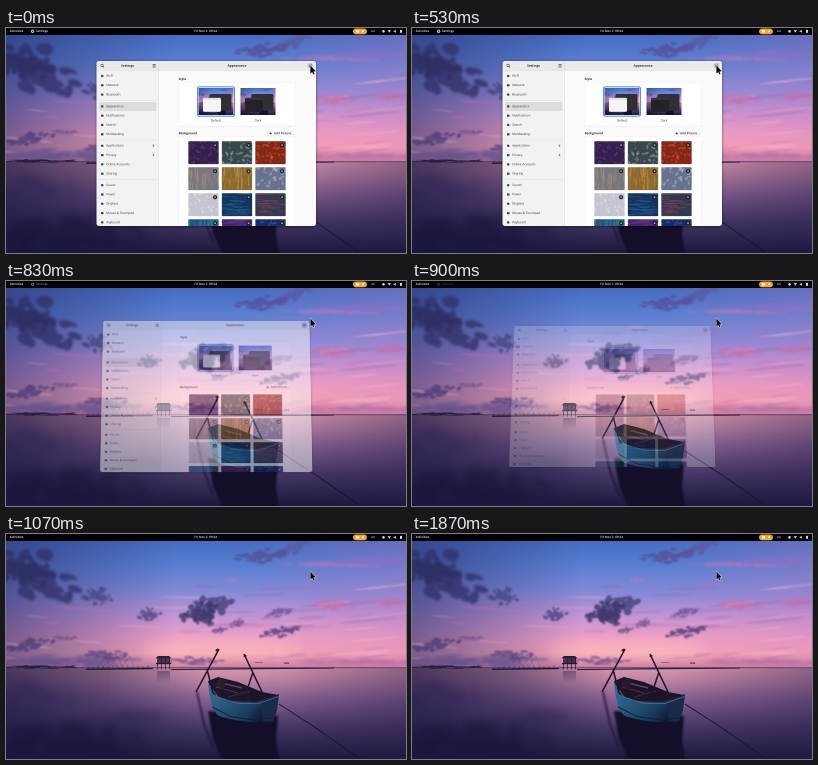
An HTML page with a canvas for the animation above (2000 ms loop, 400 px wide and 225 px high).

```html
<!DOCTYPE html>
<html lang="en">
<head>
<meta charset="utf-8">
<title>Closing a settings window</title>
<style>
html, body { margin: 0; width: 400px; height: 225px; overflow: hidden; background: #000; }
canvas { display: block; width: 400px; height: 225px; }
</style>
</head>
<body>
<canvas id="stage"></canvas>
<script>
const W = 400, H = 225, K = 4, LOOP = 2000;
const FONT = '"Open Sans", "Noto Sans", sans-serif';

// Layers are drawn at K times the stage size and scaled down.
function layer(draw) {
  const c = document.createElement('canvas');
  c.width = W * K;
  c.height = H * K;
  const g = c.getContext('2d');
  g.scale(K, K);
  g.textBaseline = 'middle';
  g.textRendering = 'geometricPrecision';
  draw(g);
  return c;
}

let seed;
const rnd = () => (seed = seed * 16807 % 2147483647) / 2147483647;
const spread = () => rnd() + rnd() - 1;

function box(g, x, y, w, h, fill, r = 0) {
  g.fillStyle = fill;
  g.beginPath();
  g.roundRect(x, y, w, h, r);
  g.fill();
}
function oval(g, x, y, rx, ry, fill, turn = 0) {
  g.fillStyle = fill;
  g.beginPath();
  g.ellipse(x, y, rx, ry, turn, 0, 7);
  g.fill();
}
function line(g, color, width, ...p) {
  g.strokeStyle = color;
  g.lineWidth = width;
  g.beginPath();
  for (let i = 0; i < p.length; i += 2) g.lineTo(p[i], p[i + 1]);
  g.stroke();
}
function poly(g, fill, ...p) {
  g.fillStyle = fill;
  g.beginPath();
  for (let i = 0; i < p.length; i += 2) g.lineTo(p[i], p[i + 1]);
  g.closePath();
  g.fill();
}
function text(g, s, x, y, { size = 3.1, color = '#2e3436', weight = 400, align = 'left' } = {}) {
  g.font = `${weight} ${size}px ${FONT}`;
  g.fillStyle = color;
  g.textAlign = align;
  g.fillText(s, x, y);
}
function fade(g, x0, y0, x1, y1, ...stops) {
  const f = g.createLinearGradient(x0, y0, x1, y1);
  stops.forEach(([at, color]) => f.addColorStop(at, color));
  return f;
}
// One path of overlapping puffs, so that a translucent fill stays even
function cloud(g, x, y, rx, ry, color, turn = 0) {
  g.save();
  g.translate(x, y);
  g.rotate(turn);
  g.beginPath();
  for (let i = 0; i < 60; i++) {
    const px = spread() * rx, py = spread() * ry * (1 - Math.abs(px / rx) * .6);
    const a = rx * (.04 + rnd() * .12), b = ry * (.06 + rnd() * .16);
    g.moveTo(px + a, py);
    g.ellipse(px, py, a, b, 0, 0, 7);
  }
  g.fillStyle = color;
  g.fill();
  g.restore();
}

const wall = layer(g => {
  seed = 7;
  const blur = r => g.filter = r ? `blur(${K * r}px)` : 'none';

  box(g, 0, 0, W, 134, fade(g, 0, 0, 0, 134, [0, '#3f68bf'], [.25, '#5c80d2'], [.45, '#8a8bd8'],
    [.62, '#c496d3'], [.78, '#f0a0c4'], [.89, '#f6a5b8'], [.96, '#dc8da9'], [1, '#c87f9d']));
  box(g, 0, 134, W, 91, fade(g, 0, 134, 0, H, [0, '#d997ae'], [.13, '#bf84a5'], [.36, '#825e90'],
    [.66, '#453866'], [1, '#1c183c']));
  box(g, 0, 0, W, 134, fade(g, 0, 0, 170, 0, [0, '#2b2f6c99'], [1, '#2b2f6c00']));
  box(g, 0, 0, W, 134, fade(g, 250, 0, W, 0, [0, '#c873b400'], [1, '#c873b444']));
  box(g, 0, 134, W, 91, fade(g, 0, 0, 200, 0, [0, '#1a1842c0'], [.5, '#1a184277'], [1, '#1a184200']));
  box(g, 0, 134, W, 91, fade(g, 260, 0, W, 0, [0, '#261a4700'], [1, '#261a4766']));

  // Glow and thin streaks
  blur(6);
  oval(g, 215, 116, 80, 8, '#ffc6bd88');
  blur(.8);
  for (let i = 0; i < 55; i++) {
    const x = rnd() * W, y = 50 + rnd() * 80;
    const color = ['#ffc4d044', '#8560a33c', '#d36fae44'][i % 3];
    oval(g, x, y, 8 + rnd() * 26, .5 + rnd() * 1.3, color, (x - 200) * -.0006);
  }
  blur(1.3);
  cloud(g, 362, 27, 60, 6, '#a06fc066', -.06);
  cloud(g, 325, 31, 50, 2.5, '#d97fbb99', .02);
  cloud(g, 225, 46, 9, 2.5, '#d586bd77');
  cloud(g, 325, 71, 24, 5, '#d4619a99');
  cloud(g, 385, 68, 20, 5, '#d4619a77');
  cloud(g, 350, 128, 70, 4, '#9b5b9a77');
  cloud(g, 60, 127, 85, 7, '#514a8d99');

  // Dark clouds
  cloud(g, 32, 46, 56, 30, '#32326acc', .34);
  cloud(g, 14, 34, 34, 18, '#2c2d60bb', .3);
  blur(.8);
  cloud(g, 93, 61, 15, 11, '#43437fbb', .5);
  cloud(g, 143, 81, 14, 8, '#4c427fcc', -.2);
  cloud(g, 202, 74, 28, 18, '#45407acc', -.35);
  cloud(g, 196, 79, 21, 14, '#3b356acc', -.2);
  cloud(g, 256, 22, 30, 8, '#554d93bb', -.1);
  cloud(g, 287, 14, 22, 8, '#5d529899', -.4);
  cloud(g, 272, 79, 17, 5, '#6e5193cc', -.2);
  cloud(g, 275, 98, 22, 7, '#56407fdd', -.12);
  cloud(g, 232, 89, 9, 5, '#674888bb', -.5);
  cloud(g, 214, 96, 9, 4, '#5a427fcc', -.2);
  cloud(g, 25, 111, 26, 7, '#4d3d78cc', -.2);
  cloud(g, 60, 104, 12, 3, '#5e498699');
  cloud(g, 100, 121, 26, 6, '#563f7fbb');
  cloud(g, 185, 127, 36, 5, '#6f4d8bbb');

  // Cloud reflections
  blur(4);
  cloud(g, 125, 184, 34, 12, '#2c215377');
  cloud(g, 30, 160, 50, 16, '#2b235477');
  cloud(g, 60, 205, 80, 22, '#14112f77');
  blur(0);

  // Shore, jetty and hut
  box(g, 0, 133.4, W, .8, '#4a3160');
  cloud(g, 30, 133, 45, 2, '#231e42');
  line(g, '#231c3a', 1.4, 80, 135.3, 147, 134.5);
  for (let x = 82; x < 147; x += 5) line(g, '#2d2346', .5, x, 131 + rnd() * 2, x, 136);
  for (let x = 92; x < 118; x += 6) line(g, '#3a2e5c77', .4, x, 133, x + 8, 122, x + 12, 133);
  poly(g, '#281c35', 149.5, 124.4, 152, 122, 163, 122, 165.5, 124.4);
  box(g, 152, 124.4, 12, 5, '#46304f');
  box(g, 150, 129, 15, 1.2, '#201831');
  for (const x of [151.5, 155.5, 159.5, 163.5]) line(g, '#201831', .7, x, 124, x, 135.5);
  box(g, 151, 137, 13, 12, fade(g, 0, 137, 0, 149, [0, '#43305f88'], [1, '#43305f00']));
  line(g, '#2c1b38', 1.1, 165, 135.6, 240, 134.8, 328, 134);
  box(g, 249, 128, 8, .7, '#754b7b');
  box(g, 278, 128.5, 5, 1.2, '#573763');

  // Boat and its reflection
  blur(1);
  poly(g, '#130f2a', 202, 177, 272, 182, 270, 206, 273, 227, 217, 227, 207, 205);
  line(g, '#1a1433', 1.6, 191, 158, 198, 190, 207, 214);
  blur(0);
  line(g, '#1a1230', .9, 273, 170, 310, 194, 353, 224);
  g.fillStyle = fade(g, 205, 155, 250, 192, [0, '#2f6b92'], [.4, '#245578'], [.75, '#193c5c'], [1, '#0f1c38']);
  g.beginPath();
  g.moveTo(202, 147);
  g.quadraticCurveTo(216, 167, 250, 167);
  g.lineTo(273, 160);
  g.quadraticCurveTo(271, 180, 267, 188);
  g.quadraticCurveTo(238, 190, 213, 182);
  g.quadraticCurveTo(204, 176, 202, 147);
  g.fill();
  poly(g, '#1a2a48', 255, 168, 273, 160, 271, 176, 267, 187, 257, 187);
  poly(g, '#1d1428', 202, 147, 212, 143, 232, 148, 256, 158, 272, 161, 250, 168, 222, 167, 207, 160);
  line(g, '#557896', .7, 202.5, 150, 212, 163, 232, 169.4, 253, 169.4, 272.5, 162.5);
  line(g, '#5b3049', .9, 210, 153, 232, 159);
  line(g, '#564066', 1.6, 216, 149, 236, 154);
  line(g, '#46314f', .8, 222, 163, 244, 157);
  poly(g, '#2a1a2c', 209, 151, 214, 144, 220, 146, 217, 156);
  line(g, '#112038', 1, 206, 173, 226, 183, 250, 186, 268, 184);
  for (const p of [[213, 115, 190, 158], [201, 135, 207, 159], [238, 120, 257, 160], [247, 138, 240, 159]]) {
    line(g, '#21142a', 1.5, ...p);
  }
  oval(g, 211, 116, 1.8, 1, '#2a1a34', -.6);
  oval(g, 239, 122, 1.5, 1.2, '#2a1a34');
});

const groups = [
  [48, 'Wi-Fi', 'Network', 'Bluetooth'],
  [78.4, 'Appearance', 'Notifications', 'Search', 'Multitasking'],
  [117.8, 'Applications', 'Privacy', 'Online Accounts', 'Sharing'],
  [157.2, 'Sound', 'Power', 'Displays', 'Mouse & Touchpad', 'Keyboard']
];

// Base tone, accent tone, and texture: blobs, vertical or horizontal streaks
const pictures = [
  ['#34204f', '#70408a', 'blob'], ['#38494c', '#a9b6ad', 'blob'], ['#842719', '#d2602b', 'blob'],
  ['#777681', '#b49b68', 'down'], ['#8d692f', '#d5a750', 'down'], ['#66738f', '#bbc5d6', 'blob'],
  ['#c4c5d0', '#e7e7ee', 'blob'], ['#14345f', '#2a73a8', 'across'], ['#30394f', '#a04457', 'across'],
  ['#23577f', '#39a0b2', 'down'], ['#44256e', '#8045a0', 'across'], ['#182d68', '#4462b5', 'blob']
];

function picture(g, x, y, [base, accent, kind]) {
  const w = 30.4, h = 23;
  g.save();
  g.beginPath();
  g.roundRect(x, y, w, h, 1);
  g.clip();
  box(g, x, y, w, h, base);
  g.globalAlpha = .45;
  for (let i = 0; i < 40; i++) {
    const px = x + rnd() * w, py = y + rnd() * h, s = rnd();
    if (kind === 'blob') oval(g, px, py, .4 + s * 2, .3 + s * .9, accent, rnd() * 3);
    if (kind === 'down') box(g, px, py - 5, .4 + s * .5, 4 + s * 9, accent);
    if (kind === 'across') box(g, px - 6, py, 5 + s * 9, .4 + s * .5, accent);
  }
  g.restore();
  oval(g, x + 26.8, y + 4, 2.1, 2.1, '#252329');
  line(g, '#fff', .4, x + 26.1, y + 3.3, x + 27.5, y + 4.7);
  line(g, '#fff', .4, x + 27.5, y + 3.3, x + 26.1, y + 4.7);
}

function stylePreview(g, x, front) {
  g.drawImage(wall, 60 * K, 8 * K, 270 * K, 214 * K, x, 60, 35, 27);
  box(g, x + 11, 66, 22, 16.5, '#302f34', 1.2);
  box(g, x + 4.5, 69.8, 18, 14, front, 1.2);
  box(g, x + 4.5, 69.8, 18, 2, '#8883', 1);
}

const settings = closeColor => layer(g => {
  seed = 41;
  g.save();
  g.shadowColor = '#0008';
  g.shadowBlur = 3 * K;
  g.shadowOffsetY = K * .6;
  box(g, 90.5, 33, 219.5, 165, '#fafafa', 2.5);
  g.restore();
  g.save();
  g.beginPath();
  g.roundRect(90.5, 33, 219.5, 165, 2.5);
  g.clip();
  box(g, 90.5, 33, 62, 165, '#f3f2f2');
  box(g, 90.5, 33, 219.5, 9.5, '#ebeaea');
  box(g, 90.5, 42.3, 219.5, .3, '#d0cfcf');
  box(g, 152.3, 33, .4, 165, '#d5d4d4');

  const title = { weight: 700, align: 'center', size: 3.2 };
  text(g, 'Settings', 121.5, 37.9, title);
  text(g, 'Appearance', 231, 37.9, title);
  g.strokeStyle = '#2e3436';
  g.lineWidth = .6;
  g.beginPath();
  g.arc(96, 37.3, 1.2, 0, 7);
  g.stroke();
  line(g, '#2e3436', .7, 96.8, 38.1, 98, 39.3);
  for (const y of [36.4, 37.6, 38.8]) box(g, 146.6, y, 3, .6, '#2e3436');
  oval(g, 304.5, 37.7, 3.1, 3.1, closeColor);
  line(g, '#2e3436', .6, 303.4, 36.6, 305.6, 38.8);
  line(g, '#2e3436', .6, 305.6, 36.6, 303.4, 38.8);

  box(g, 93, 74, 57.5, 9, '#dddcdc', 1.4);
  groups.forEach(([top, ...names], n) => {
    if (n) box(g, 93, top - 6, 57.5, .35, '#d6d5d5');
    names.forEach((name, i) => {
      const y = top + i * 9.3;
      text(g, name, 100.2, y);
      if (i % 2) box(g, 95, y - 1.1, 2.5, 2.2, '#3e4346', .4);
      else oval(g, 96.2, y, 1.3, 1.2, '#3e4346');
      if (n === 2 && i < 2) line(g, '#55585a', .6, 146.8, y - 1.2, 148, y, 146.8, y + 1.2);
    });
  });

  text(g, 'Style', 172.6, 51.2, { weight: 700 });
  box(g, 172, 54.7, 118, 43.6, '#e5e4e4', 2);
  box(g, 172.3, 54.9, 117.4, 43, '#fff', 1.8);
  box(g, 191, 58.4, 38, 30.2, '#3584e4', 2.2);
  box(g, 191.9, 59.3, 36.2, 28.4, '#fff', 1.5);
  stylePreview(g, 192.5, '#f6f5f5');
  stylePreview(g, 234.5, '#232226');
  text(g, 'Default', 210, 92.7, { align: 'center' });
  text(g, 'Dark', 252, 92.7, { align: 'center' });

  text(g, 'Background', 172.6, 105.4, { weight: 700 });
  line(g, '#2e3436', .6, 263.4, 105.3, 266.2, 105.3);
  line(g, '#2e3436', .6, 264.8, 103.9, 264.8, 106.7);
  text(g, 'Add Picture…', 268, 105.4, { weight: 600 });
  box(g, 172, 108.6, 118, 100, '#e5e4e4', 2);
  box(g, 172.3, 108.8, 117.4, 100, '#fff', 1.8);
  pictures.forEach((p, i) => picture(g, 182.3 + i % 3 * 33.5, 113.2 + Math.floor(i / 3) * 26, p));
  g.restore();
});
const hovered = settings('#cbcaca'), pressed = settings('#a9a8a8');

const bar = layer(g => {
  const white = { color: '#eee', weight: 600 };
  box(g, 0, 0, W, 7, '#000');
  text(g, 'Activities', 3.7, 3.3, white);
  text(g, 'Fri Nov 2  09:24', 199.7, 3.3, { ...white, align: 'center' });
  box(g, 347, .5, 14, 5.8, '#f5a52b', 2.9);
  box(g, 350, 2.1, 3.2, 2.4, '#fff', .4);
  oval(g, 357, 3.3, 1, 1, '#fff');
  text(g, 'en', 367, 3.3, { ...white, align: 'center', size: 2.9 });
  oval(g, 377.5, 3.3, 1.3, 1.3, '#ddd');
  poly(g, '#ddd', 381.6, 2.2, 385, 2.2, 383.3, 4.7);
  poly(g, '#ddd', 387.7, 2.7, 388.6, 2.7, 389.8, 1.7, 389.8, 4.9, 388.6, 3.9, 387.7, 3.9);
  box(g, 394, 1.8, 2, 3, '#ddd', .4);
});

const appName = layer(g => {
  oval(g, 26.6, 3.3, 1.7, 1.7, '#ccc');
  oval(g, 26.6, 3.3, .7, .7, '#333');
  text(g, 'Settings', 30, 3.3, { color: '#eee', weight: 600 });
});

const cursor = layer(g => {
  const arrow = [304.4, 37.4, 304.4, 45.6, 306.2, 44, 307.3, 46.5, 308.5, 46, 307.4, 43.5, 309.8, 43.3];
  g.lineJoin = 'round';
  line(g, '#fff', .8, ...arrow, 304.4, 37.4);
  poly(g, '#050505', ...arrow);
});

const stage = document.getElementById('stage');
const dpr = window.devicePixelRatio || 1;
stage.width = W * dpr;
stage.height = H * dpr;
const ctx = stage.getContext('2d');
ctx.scale(dpr, dpr);
ctx.imageSmoothingQuality = 'high';
const put = c => ctx.drawImage(c, 0, 0, W, H);

// Shrinks and flattens a layer about the window's centre and tips its top
// edge away, one row at a time.
function glide(image, p) {
  const cx = 200.2, cy = 115.5, half = 82.5;
  const scale = 1 - .16 * p, tall = scale * (1 - .13 * p);
  for (let y = 7; y < H; y++) {
    const from = cy + (y - cy) / tall;
    const wide = scale * (1 + .05 * p * (from - cy) / half);
    ctx.drawImage(image, 0, from * K, W * K, K / tall, cx - cx * wide, y, W * wide, 1);
  }
}

function render() {
  const t = performance.now() % LOOP;
  const u = Math.min(1, Math.max(0, (t - 757) / 470));
  const p = 1 - (1 - u) ** 2;
  const image = t < 660 ? hovered : pressed;

  put(wall);
  put(bar);
  ctx.globalAlpha = (1 - p) ** 2;
  put(appName);
  if (p) glide(image, p);
  else put(image);
  ctx.globalAlpha = 1;
  put(cursor);
  requestAnimationFrame(render);
}
render();
</script>
</body>
</html>
```
